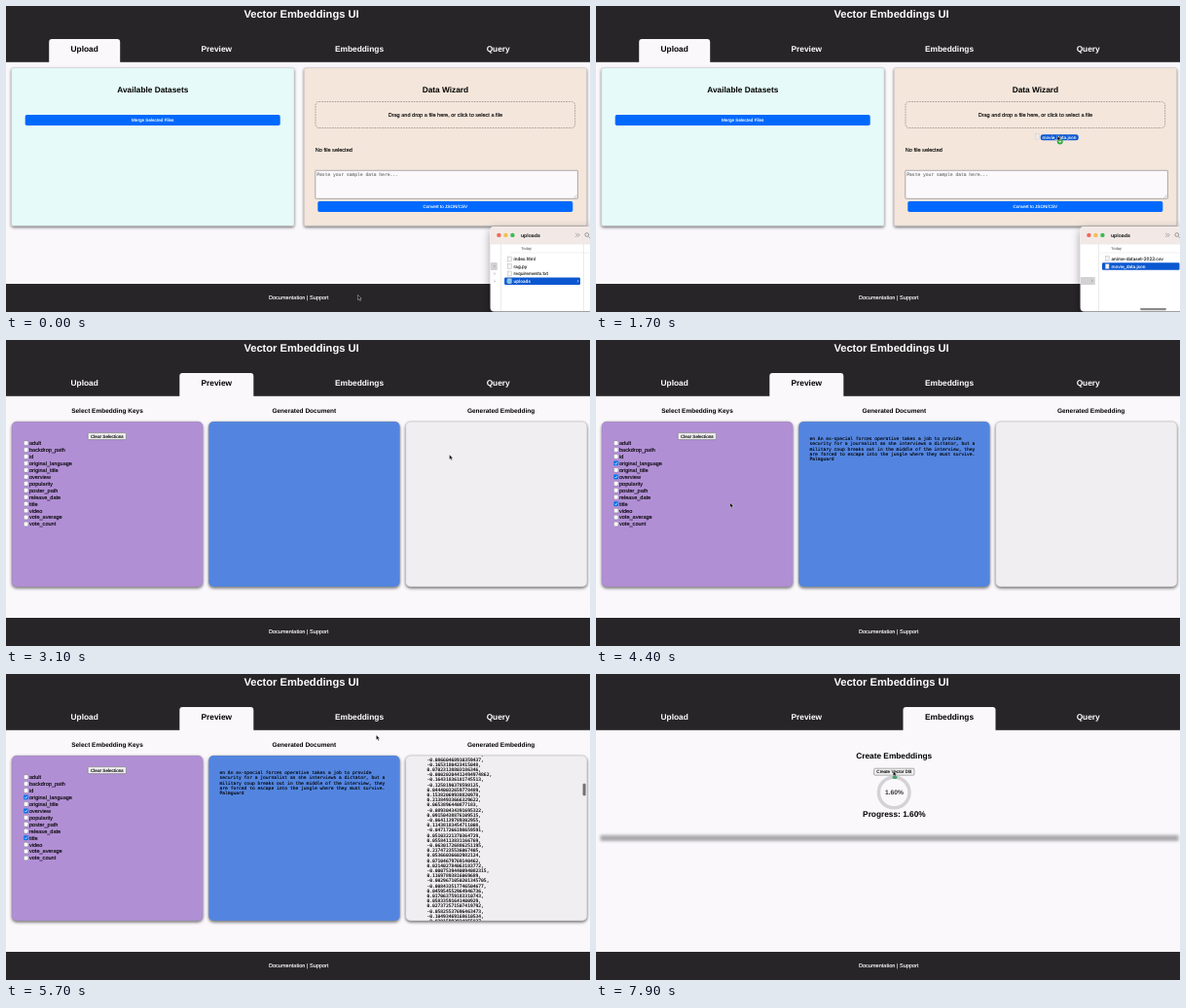
An HTML page for the animation above (8000 ms loop, 600 px wide and 315 px high).

```html
<!DOCTYPE html>
<html lang="en">
<head>
<meta charset="utf-8">
<title>Vector Embeddings UI</title>
<style>
html, body { margin: 0; width: 100%; height: 100%; overflow: hidden; background: #faf8fb; }
svg { display: block; width: 600px; height: 315px; }
text { font-family: Arial, "Liberation Sans", sans-serif; white-space: pre; text-rendering: geometricPrecision; }
.mono { font-family: "DejaVu Sans Mono", monospace; font-size: 4.63px; }
.mac { font-family: Inter, sans-serif; font-size: 4.6px; }
</style>
</head>
<body>
<svg id="stage" viewBox="0 0 600 315">
  <defs>
    <filter id="card" x="-5%" y="-5%" width="110%" height="115%">
      <feDropShadow dx="0" dy="1.4" stdDeviation="1.4" flood-opacity=".6"/>
    </filter>
    <filter id="win" x="-30%" y="-30%" width="160%" height="160%">
      <feDropShadow dx="0" dy="3" stdDeviation="5" flood-opacity=".38"/>
    </filter>
    <filter id="soft" x="-5%" y="-100%" width="110%" height="300%">
      <feGaussianBlur stdDeviation="1.5"/>
    </filter>
    <clipPath id="listClip"><rect x="410.5" y="84" width="186.5" height="170" rx="5"/></clipPath>
  </defs>
</svg>
<script>
const LOOP = 8000, STEP = 100;
const stage = document.getElementById('stage');

function el(parent, tag, attrs = {}, content) {
  const e = document.createElementNS('http://www.w3.org/2000/svg', tag);
  for (const k in attrs) e.setAttribute(k, attrs[k]);
  if (content !== undefined) e.textContent = content;
  parent.appendChild(e);
  return e;
}
const group = (parent, attrs) => el(parent, 'g', attrs);
const box = (p, x, y, width, height, fill, more) => el(p, 'rect', { x, y, width, height, fill, ...more });
const line = (p, d, stroke, width) => el(p, 'path', { d, fill: 'none', stroke, 'stroke-width': width });
// A hairline in the text colour thickens small type
const type = (p, s, x, y, { fill = '#000', ...more } = {}) =>
  el(p, 'text', { x, y, fill, stroke: fill, 'stroke-width': .12, ...more }, s);
const label = (p, s, x, y, size, more) => type(p, s, x, y, { 'font-size': size, ...more });
const centred = (p, s, x, y, size, more) => label(p, s, x, y, size, { 'text-anchor': 'middle', ...more });
const bold = (p, s, x, y, size, more) => centred(p, s, x, y, size, { 'font-weight': 700, stroke: 'none', ...more });
const mono = (p, s, x, y, more) => type(p, s, x, y, { class: 'mono', ...more });
const mac = (p, s, x, y, more) => type(p, s, x, y, { class: 'mac', fill: '#222', ...more });
const show = (e, on) => e.setAttribute('visibility', on ? 'inherit' : 'hidden');
const ease = k => (k = Math.min(1, Math.max(0, k)), k * k * (3 - 2 * k));

// Frame shared by all tabs
box(stage, 0, 0, 600, 315, '#faf8fb');
box(stage, 0, 0, 600, 57.8, '#272527');
box(stage, 0, 286, 600, 29, '#272527');
bold(stage, 'Vector Embeddings UI', 303.5, 12, 11.15, { fill: '#fff' });
centred(stage, 'Documentation | Support', 300.7, 302, 5.57, { fill: '#fff' });

const tabs = [['Upload', 80.7, 73], ['Preview', 216.3, 76], ['Embeddings', 363, 95], ['Query', 505.7, 70]]
  .map(([name, x, w]) => {
    const l = x - w / 2, r = x + w / 2;
    const plate = el(stage, 'path', { fill: '#faf8fb', d: `M${l} 58V37q0-3 3-3H${r - 3}q3 0 3 3V58z` });
    return { plate, text: bold(stage, name, x, 47.4, 8.35) };
  });

// Upload tab
const upload = group(stage);
function blueButton(x, y, s) {
  box(upload, x, y, 262, 11, '#0169fd', { rx: 1.8 });
  centred(upload, s, x + 131, y + 7.2, 4.64, { fill: '#fff' });
}
function bigCard(x, fill, title) {
  box(upload, x, 63.7, 290.3, 162.5, fill, { rx: 1.5, filter: 'url(#card)', stroke: '#aaa', 'stroke-width': .35 });
  bold(upload, title, x + 145.1, 89.4, 8.3);
}
bigCard(5.7, '#e6fbf9', 'Available Datasets');
bigCard(306.3, '#f4e6db', 'Data Wizard');
blueButton(19.7, 112, 'Merge Selected Files');
blueButton(320.3, 201, 'Convert to JSON/CSV');
box(upload, 318, 98.5, 266.6, 27, 'none', { rx: 3.5, stroke: '#8d8580', 'stroke-width': .7, 'stroke-dasharray': '1.7 1' });
centred(upload, 'Drag and drop a file here, or click to select a file', 451.4, 114, 5.57);
label(upload, 'No file selected', 317.8, 149.8, 5.57);
box(upload, 317.8, 169.3, 269.6, 29, '#fbf9fb', { rx: .7, stroke: '#777', 'stroke-width': .6 });
mono(upload, 'Paste your sample data here...', 319.3, 174.7, { fill: '#757575' });
line(upload, 'M583.5 197.5l3-3M585.2 197.5l1.3-1.3', '#888', .4);

// Preview tab
const preview = group(stage);
['Select Embedding Keys', 'Generated Document', 'Generated Embedding'].forEach((s, i) => {
  const x = 6 + i * 202.3, w = i < 2 ? 196.2 : 186.4;
  bold(preview, s, x + 98, 75.4, 6.5);
  box(preview, x, 84, w, 170, ['#b18fd5', '#5385e0', '#f0eef0'][i],
    { rx: 5, filter: 'url(#card)', stroke: '#777', 'stroke-width': .25 });
});
function greyButton(p, x, y, w, s) {
  box(p, x, y, w, 7, '#efeff0', { rx: 1, stroke: '#666', 'stroke-width': .5 });
  centred(p, s, x + w / 2, y + 5.1, 4.64);
}
greyButton(preview, 84.2, 95.6, 39.2, 'Clear Selections');

const keys = ['adult', 'backdrop_path', 'id', 'original_language', 'original_title', 'overview', 'popularity',
  'poster_path', 'release_date', 'title', 'video', 'vote_average', 'vote_count'];
const picked = ['original_language', 'overview', 'title'];
const keyY = key => 106.1 + keys.indexOf(key) * 6.95;
const pickTime = i => 3800 + i * 200;
for (const key of keys) {
  const y = keyY(key);
  label(preview, key, 24, y + 1.9, 5.57);
  box(preview, 18.4, y - 2.2, 4.4, 4.4, '#fff', { rx: .8, stroke: '#767676', 'stroke-width': .4 });
}
const ticks = picked.map(key => {
  const g = group(preview), y = keyY(key);
  box(g, 18.2, y - 2.4, 4.8, 4.8, '#0070f5', { rx: .8 });
  line(g, `M19.3 ${y}l1.1 1.2 1.6-2.4`, '#fff', .7);
  return g;
});

// Document text grows with each picked key
const pieces = [['en'], [
  'en An ex-special forces operative takes a job to provide',
  'security for a journalist as she interviews a dictator, but a',
  'military coup breaks out in the middle of the interview, they',
  'are forced to escape into the jungle where they must survive.']];
pieces.push([...pieces[1], 'Palmguard']);
const documents = pieces.map(lines => {
  const g = group(preview);
  lines.forEach((s, i) => mono(g, s, 219.5, 103.1 + i * 5.22));
  return g;
});

// Long vector in a scrolling list
let seed = 7;
const rand = () => (seed = seed * 16807 % 2147483647) / 2147483647;
const embedding = group(preview, { 'clip-path': 'url(#listClip)' });
const list = group(embedding);
mono(list, '[', 421.5, 103.1);
for (let i = 1; i <= 384; i++)
  mono(list, `${(rand() - .5) * (.1 + rand() * .35)},`, 432.4, 103.1 + i * 5.2);
const thumb = box(embedding, 592.6, 85, 3, 12.5, '#737173', { rx: 1 });

// Embeddings tab
const create = group(stage);
bold(create, 'Create Embeddings', 306.2, 87, 8.3);
greyButton(create, 285.6, 97.2, 41.4, 'Create Vector DB');
const bar = box(create, 4.5, 156, 594, 6.2, '#a9a8ab', { filter: 'url(#soft)' });
const meter = group(create);
const ring = { cx: 306.2, cy: 122, r: 15.8, fill: 'none', 'stroke-width': 3.5 };
el(meter, 'circle', { ...ring, stroke: '#d3d2d5' });
const arc = el(meter, 'circle', { ...ring, stroke: '#3f9f6c', pathLength: 100, 'stroke-linecap': 'round', transform: 'rotate(-90 306.2 122)' });
const percent = bold(meter, '', 306.4, 124.4, 6.65, { fill: '#333' });
const progress = bold(meter, '', 306.4, 147, 8.3);

// File browser window
const finder = group(stage);
box(finder, 497.6, 227, 112, 87.4, '#fff', { rx: 4, filter: 'url(#win)' });
el(finder, 'path', { d: 'M497.6 245V231q0-4 4-4H600V245z', fill: '#f2e9e6' });
['#ee6a5f', '#f5bd4f', '#3cba54'].forEach((fill, i) => el(finder, 'circle', { cx: 506.4 + i * 7, cy: 235.9, r: 2.2, fill }));
mac(finder, 'uploads', 529, 237.7, { style: 'font-size:5.1px;font-weight:600' });
line(finder, 'M585 233.8l2 2-2 2m2.3-4l2 2-2 2M598.3 237.3l2 2', '#777', .6);
el(finder, 'circle', { cx: 596.8, cy: 235.5, r: 1.9, fill: 'none', stroke: '#666', 'stroke-width': .6 });
line(finder, 'M497.6 245.2H600M518 254H600', '#dedcdd', .4);
mac(finder, 'Today', 529, 251.2, { style: 'font-size:3.8px', fill: '#777' });

const chevron = (p, x, y, colour) => line(p, `M${x} ${y - 1.2}l1.2 1.2-1.2 1.2`, colour, .5);
const divider = (p, x) => line(p, `M${x} 245V314`, '#d8d6d8', .5);
function fileRow(p, name, x, y, right) {
  if (right) box(p, x - 9.5, y - 3.7, right - x + 9.5, 7.4, '#0b57d0', { rx: 1.2 });
  box(p, x - 6.2, y - 2.5, 3.8, 5, '#f4f4f4', { stroke: '#999', 'stroke-width': .35 });
  mac(p, name, x, y + 1.6, right ? { fill: '#fff' } : {});
}
const root = group(finder), inner = group(finder);
box(root, 497.8, 264, 7, 8, '#d3d2d3', { rx: 1 });
for (let i = 0; i < 3; i++) chevron(root, 501.3, 268 + i * 7.6, '#777');
divider(root, 508.5);
divider(root, 593.5);
['index.html', 'rag.py', 'requirements.txt'].forEach((s, i) => fileRow(root, s, 521.6, 260.5 + i * 7.5));
fileRow(root, 'uploads', 521.6, 283.2, 590);
box(root, 514.5, 281.3, 5, 3.8, '#7fc4f5', { rx: .6 });
chevron(root, 587, 283.2, '#fff');
box(inner, 497.8, 279, 15, 8, '#d3d2d3', { rx: 1 });
chevron(inner, 509, 283, '#777');
divider(inner, 516.5);
fileRow(inner, 'anime-dataset-2023.csv', 529.5, 260.2);
fileRow(inner, 'movie_data.json', 529.5, 268, 599.5);
const slider = box(inner, 559, 311, 27, 2.2, '#8b898b', { rx: 1.1 });

// Dragged file, relative to the pointer tip
const drag = group(stage);
box(drag, -22.5, -1.8, 4, 5.4, '#eee', { stroke: '#aaa', 'stroke-width': .3, opacity: .7 });
box(drag, -17.3, -1.2, 39, 6, '#0b57d0', { rx: 2.5 });
mac(drag, 'movie_data.json', -15.6, 3.3, { fill: '#fff' });
el(drag, 'circle', { cx: 2.7, cy: 6, r: 3, fill: '#2fa83a' });
line(drag, 'M1.2 6h3M2.7 4.5v3', '#fff', .7);

const arrow = el(stage, 'path', { d: 'M0 0V5l1.2-1 .9 2 .9-.4-.9-1.9h1.6z', fill: '#000', stroke: '#fff', 'stroke-width': .4 });
const beam = line(stage, 'M-1 0q1 0 1 .7 0-.7 1-.7M0 .7V6M-1 6.7q1 0 1-.7 0 .7 1 .7', '#000', .5);

// The pointer rests at each place from one time to another and eases between them
const route = [
  { x: 361.5, y: 297.5, from: 0, to: 100 },
  { x: 535, y: 282, from: 600, to: 800 },
  { x: 546, y: 265, from: 1000, to: 1100 },
  { x: 474, y: 133.5, from: 1700, to: 1700 },
  { x: 450, y: 112, from: 1900, to: 2100 },
  { x: 546, y: 265, from: 2500, to: 2600 },
  { x: 216, y: 44, from: 2900, to: 2900 },
  { x: 455.5, y: 118, from: 3100, to: 3300 },
  ...picked.map((key, i) => ({ x: 20, y: keyY(key), from: pickTime(i), to: pickTime(i) + 100 })),
  { x: 474, y: 164, from: 4600, to: 5400 },
  { x: 363, y: 44, from: 5800, to: 5800 },
  { x: 305.3, y: 100, from: 6200, to: LOOP }
];
function pointer(t) {
  const n = route.findIndex(stop => t <= stop.to);
  const b = route[n], a = route[n - 1] || b;
  const k = t >= b.from ? 1 : ease((t - a.to) / (b.from - a.to));
  return [a.x + (b.x - a.x) * k, a.y + (b.y - a.y) * k];
}

function render(t) {
  const active = t < 2900 ? 0 : t < 5800 ? 1 : 2;
  tabs.forEach(({ plate, text }, i) => {
    show(plate, i === active);
    text.setAttribute('fill', i === active ? '#000' : '#fff');
  });
  [upload, preview, create].forEach((page, i) => show(page, i === active));

  show(finder, t < 2800);
  show(root, t < 800);
  show(inner, t >= 800);
  show(slider, t >= 800 && t < 2000);

  ticks.forEach((g, i) => show(g, t >= pickTime(i)));
  const shown = Math.min(2, Math.floor((t - pickTime(0) - 100) / 200));
  documents.forEach((g, i) => show(g, i === shown));
  show(embedding, t >= 4600);
  const offset = 356.6 * ease((t - 4700) / 700);
  list.setAttribute('transform', `translate(0 ${-offset})`);
  thumb.setAttribute('y', 85 + offset * .0775);

  const busy = t >= 6600;
  const done = busy ? 1.6 * ((t - 6600) / 1300) ** 2 : 0;
  show(meter, busy);
  bar.setAttribute('y', busy ? 165.8 : 156);
  arc.setAttribute('stroke-dasharray', `${done} 100`);
  percent.textContent = done.toFixed(2) + '%';
  progress.textContent = `Progress: ${done.toFixed(2)}%`;

  const at = `translate(${pointer(t).join(' ')})`;
  for (const e of [arrow, beam, drag]) e.setAttribute('transform', at);
  const reading = t >= 4600 && t <= 5400;
  show(arrow, !reading);
  show(beam, reading);
  show(drag, t > 1100 && t < 2000);
}

let last = -1;
function tick(now) {
  const t = Math.floor(now % LOOP / STEP) * STEP;
  if (t !== last) render(last = t);
  requestAnimationFrame(tick);
}
tick(0);
</script>
</body>
</html>
```
